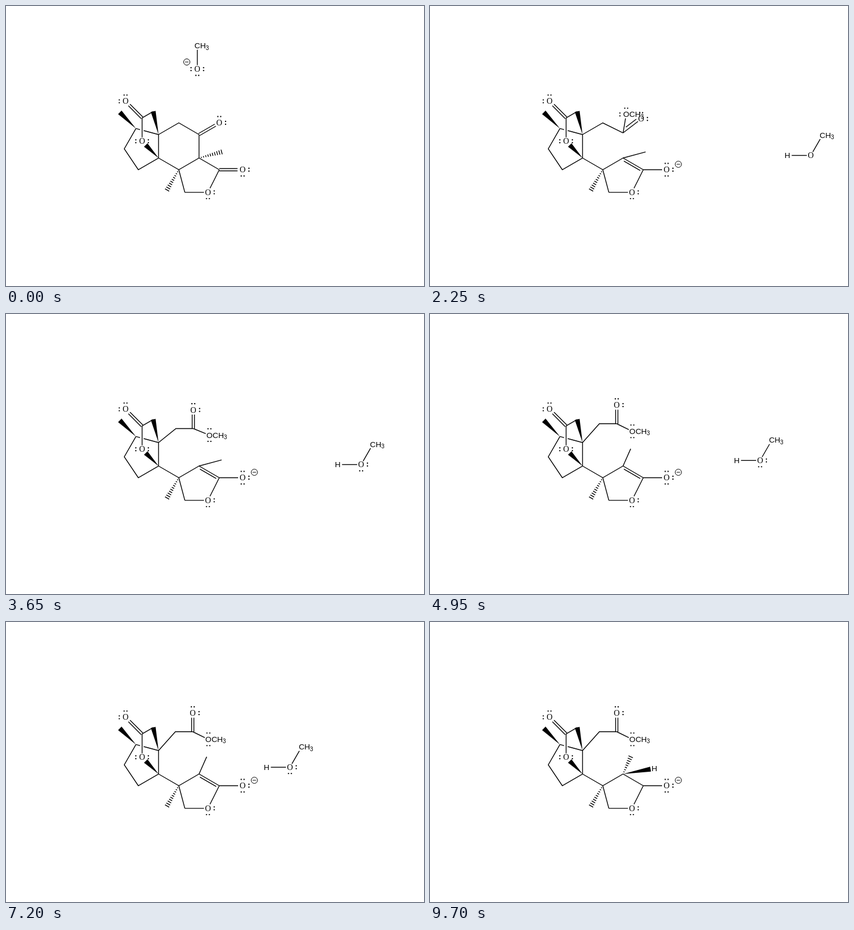
An HTML page with a canvas that plays this animation: 733 by 490 pixels, repeating every 9.75 s.

```html
<!DOCTYPE html>
<html lang="en">
<head>
<meta charset="utf-8">
<title>Reaction mechanism</title>
<style>
  html, body { margin: 0; width: 100%; height: 100%; overflow: hidden; background: #fff; }
  canvas { display: block; }
</style>
</head>
<body>
<canvas width="733" height="490"></canvas>
<script>
const ctx = document.querySelector('canvas').getContext('2d');
const LOOP = 9750, STEP = 50, BOND = 41;
const SERIF = '14.4px "Liberation Serif", serif';
const SANS = '13.7px "Liberation Sans", sans-serif';
const SUB = '10px "Liberation Sans", sans-serif';

// Times of the hard changes
const ATTACK = 1900, CLEAVE = 2000, ENOLATE = 2050, CONDENSE = 2150, PAIRS = 2600,
      PROTONATE = 8850, LEAVE = 9700;

// Point at an angle (degrees clockwise from the right) and a distance from p
function polar([x, y], angle, len = BOND) {
  const a = angle * Math.PI / 180;
  return [x + len * Math.cos(a), y + len * Math.sin(a)];
}

// The skeleton grows from a regular hexagon by bonds of equal length
const [, G0, J, K, C, B] = [0, 1, 2, 3, 4, 5].map(i => polar([303, 245.5], 60 * i - 90));
const A = polar(B, 195), D = polar(C, 150), E = polar(A, 120);
const bridge = polar(A, -60, 21.5), bridgeCH2 = polar(bridge, -30, 22.5);
const bridgeO = polar(bridge, 90), bridgeOxo = polar(bridge, 225);
const L = polar(J, 30), enolO = polar(L, 0), M = polar(K, 75), ringO = polar(M, 0, 40.5);

const mix = (a, b, p) => a + (b - a) * p;
const ramp = (t, from, to) => Math.min(1, Math.max(0, (t - from) / (to - from)));
const smooth = p => p * p * (3 - 2 * p);

// Unit direction and normal from p to q, and the distance between them
function frame(p, q) {
  const dx = q[0] - p[0], dy = q[1] - p[1], len = Math.hypot(dx, dy);
  return { u: [dx / len, dy / len], n: [-dy / len, dx / len], len };
}

const shift = (p, v, d) => [p[0] + v[0] * d, p[1] + v[1] * d];

function line(...points) {
  ctx.beginPath();
  points.forEach(p => ctx.lineTo(...p));
  ctx.stroke();
}

// A bond shortened at both ends and moved sideways
function bond(p, q, end = 0, start = 0, side = 0) {
  const { u, n } = frame(p, q);
  line(shift(shift(p, u, start), n, side), shift(shift(q, u, -end), n, side));
}

function double(p, q, end) {
  bond(p, q, end, 0, -2);
  bond(p, q, end, 0, 2);
}

function wedge(p, q) {
  const { n } = frame(p, q);
  ctx.beginPath();
  [p, shift(q, n, 4.3), shift(q, n, -4.3)].forEach(v => ctx.lineTo(...v));
  ctx.fill();
}

function hash(p, q) {
  const { u, n, len } = frame(p, q), count = Math.round(len / 4);
  for (let i = 1; i <= count; i++) {
    const c = shift(p, u, len * i / count), half = 0.6 + 3.6 * i / count;
    line(shift(c, n, half), shift(c, n, -half));
  }
}

function text(s, x, y, font = SANS, align = 'center') {
  ctx.font = font;
  ctx.textAlign = align;
  ctx.fillText(s, x, y);
}

// The letter C is centred on the point
function methyl([x, y]) {
  text('CH', x - 5, y + 4.6, SANS, 'left');
  text('3', x + 14.7, y + 7, SUB, 'left');
}

function dot(x, y) {
  ctx.beginPath();
  ctx.arc(x, y, 1.15, 0, 7);
  ctx.fill();
}

// Lone pairs on the sides named by the letters r, b, l, t
function pairs(p, sides) {
  for (const s of sides) {
    const angle = 90 * 'rblt'.indexOf(s), middle = polar(p, angle, 11);
    for (const d of [-2.5, 2.5]) dot(...polar(middle, angle + 90, d));
  }
}

function oxygen(p, sides = '') {
  text('O', p[0], p[1] + 4.6, SERIF);
  pairs(p, sides);
}

function minus(x, y) {
  ctx.lineWidth = 1;
  ctx.beginPath();
  ctx.arc(x, y, 5.5, 0, 7);
  ctx.stroke();
  line([x - 3, y], [x + 3, y]);
  ctx.lineWidth = 1.4;
}

function drawBicycle() {
  bond(A, B, 33.5);
  bond(A, B, 0, 14);
  line(B, C, D, E, A);
  bond(bridge, bridgeCH2);
  bond(bridge, bridgeO, 7);
  double(bridge, bridgeOxo, 9);
  wedge(A, polar(A, 225, 40));
  wedge(B, bridgeCH2);
  wedge(C, polar(C, 225.5, 32));
  oxygen(bridgeOxo, 'lt');
  oxygen(bridgeO, 'lr');
}

function drawLactone(t) {
  const done = t >= PROTONATE, turn = ramp(t, 4050, 4950);
  const end = polar(J, mix(-15, -66, turn), mix(BOND, 33, turn));
  line(C, K, J, L);
  line(K, M);
  bond(M, ringO, 7);
  bond(L, ringO, 8);
  hash(K, polar(K, 120));
  if (t >= CLEAVE && !done) {
    bond(J, end);
    bond(J, L, 4, 4, 4);
  } else {
    hash(J, end);
  }
  if (done) {
    wedge(J, polar(J, -10, 49));
    text('H', J[0] + 55, J[1] - 4.7);
  }
  oxygen(ringO, 'rb');
  if (t < ENOLATE) {
    double(L, enolO, 9);
    oxygen(enolO, 'rb');
  } else {
    bond(L, enolO, 8);
    oxygen(enolO, 'rbt');
    minus(435.5, 277);
  }
}

function drawEster(t) {
  const turn = ramp(t, ENOLATE, 3650), slide = ramp(t, 3000, 3650), rise = ramp(t, 4050, 4950);
  const F = [303 - 5 * slide - rise, 204.5 - 4 * slide - 8.5 * rise];
  const G = polar(F, mix(30, 0, turn), mix(BOND, 30.5, turn));
  const O = polar(G, mix(-30, -90, turn), mix(BOND, 32.5, turn));
  const OMe = polar(G, mix(-95, 22, turn) + 4 * rise, mix(33, 30.5, turn));
  line(B, F, G);
  if (t < CLEAVE) bond(G0, J);
  if (t >= ATTACK && t < CLEAVE) {
    bond(G, O, 7);
    oxygen(O, 'trb');
    minus(389, 191);
  } else {
    if (t >= CLEAVE && t < PAIRS) {
      bond(G, O, 7);
      bond(G, O, 7, 10, -5);
    } else {
      double(G, O, 8);
    }
    oxygen(O, 'tr');
  }
  if (t >= CONDENSE) {
    bond(G, OMe, 7);
    text('O', OMe[0], OMe[1] + 4.6);
    methyl([OMe[0] + 10.5, OMe[1]]);
    pairs(OMe, t < PAIRS ? 'lt' : 'tb');
  }
}

function drawMethoxide(t) {
  if (t >= CONDENSE) return;
  const O = [335.5, 110.5 + 0.0334 * Math.min(t, ATTACK - STEP)];
  const carbon = polar(O, -90), bound = t >= ATTACK;
  bond(O, carbon, 7, 7);
  methyl(carbon);
  oxygen(O, bound ? 'lr' : 'lrb');
  if (bound) bond(O, G0, 0, 7);
  else minus(O[0] - 18.5, O[1] - 12.5);
}

function drawMethanol(t) {
  if (t < ENOLATE || t >= LEAVE) return;
  const s = (Math.min(t, PROTONATE) - ENOLATE) / 1000;
  const O = [
    674 - 31 * s - 0.62 * s * s + 9 * ramp(t, 9000, LEAVE),
    261.5 + 2 * ramp(t, 2250, 3650) - 9.5 * smooth(ramp(t, 4000, 5400)) + 2.5 * smooth(ramp(t, 7000, 8200))
  ];
  const carbon = polar(O, -60);
  bond(O, carbon, 8, 7);
  methyl(carbon);
  if (t < PROTONATE) {
    const H = polar(O, 180);
    bond(O, H, 7.5, 7);
    text('H', H[0], H[1] + 4.6);
    oxygen(O, t < PAIRS ? '' : 'rb');
  } else {
    oxygen(O, 'lrb');
  }
}

function draw(now) {
  const t = Math.floor(now % LOOP / STEP) * STEP;
  ctx.fillStyle = '#fff';
  ctx.fillRect(0, 0, 733, 490);
  ctx.fillStyle = ctx.strokeStyle = '#000';
  ctx.lineWidth = 1.4;
  drawBicycle();
  drawLactone(t);
  drawEster(t);
  drawMethoxide(t);
  drawMethanol(t);
}

const begin = performance.now();
function tick() {
  draw(performance.now() - begin);
  requestAnimationFrame(tick);
}
tick();
</script>
</body>
</html>
```
